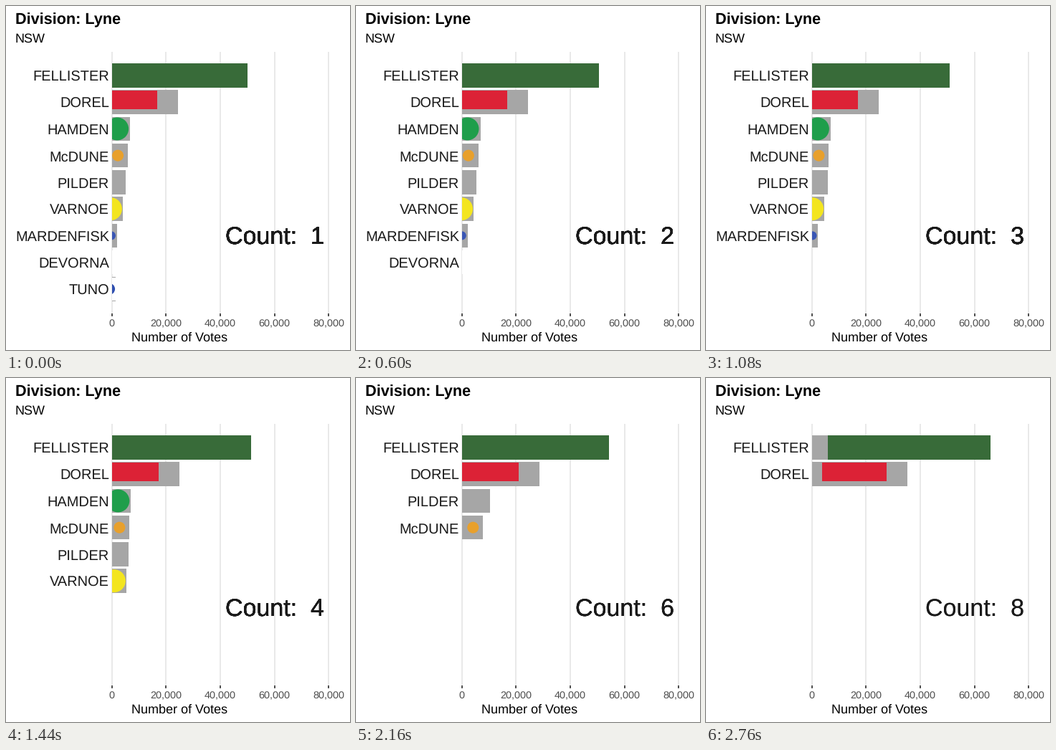
Write a matplotlib script that moves like this. It is 480 px wide and 480 px high and loops after 3000 ms.

```python
import matplotlib.pyplot as plt
import numpy as np
from matplotlib.animation import FuncAnimation
from matplotlib.patches import Circle, Rectangle

plt.rcParams["font.family"] = "Liberation Sans"
plt.rcParams["text.hinting"] = "none"

SIZE, DPI = 480, 100
FRAMES, INTERVAL = 25, 120
X0, PX_PER_K = 147.8, 3.78          # axis zero, pixels per thousand votes
TOP, PITCH, BAR_H = 80.1, 37.25, 33.6
GREY = "#a6a6a6"

# Thousands of votes at each count, until the candidate is excluded
VOTES = {
    "FELLISTER": (50.1, 50.6, 50.9, 51.4, 53.5, 54.3, 57.8, 65.9),
    "DOREL": (24.4, 24.5, 24.7, 25.0, 25.5, 28.7, 30.0, 35.2),
    "HAMDEN": (6.7, 6.8, 6.9, 7.0, 7.2),
    "McDUNE": (5.9, 6.1, 6.25, 6.5, 7.3, 7.8),
    "PILDER": (5.1, 5.4, 5.9, 6.2, 7.7, 10.4, 13.2),
    "VARNOE": (4.0, 4.3, 4.6, 5.3),
    "MARDENFISK": (1.9, 2.1, 2.3),
    "DEVORNA": (1.6, 1.7),
    "TUNO": (1.4,),
}

# Party blocks: colour, left and right edge from the bar's end, top, height
BLOCKS = {
    "FELLISTER": ("#386b39", -227, 0, 0, BAR_H),
    "DOREL": ("#dc2236", -119, -29, 0.4, 26),
    "DEVORNA": ("white", -34, 0, 0.2, BAR_H - 0.6),
    "TUNO": ("white", -34, 0, 0.4, BAR_H - 0.8),
}
# Party discs: colour, radius, distance of the centre from the bar's end
DISCS = {
    "HAMDEN": ("#1f9e4b", 16, 18),
    "McDUNE": ("#e8a02c", 8, 14),
    "VARNOE": ("#f3e51f", 16, 17),
    "MARDENFISK": ("#3a56b4", 6, 8),
    "TUNO": ("#2f4fb0", 8, 9),
}

# Frames between which each count stands still
ENTER = (0, 3, 7, 10, 13, 16, 19, 22)
LEAVE = (1, 5, 9, 12, 15, 18, 21, 24)
KEY_TIMES = np.ravel(list(zip(ENTER, LEAVE)))
KEY_COUNTS = np.repeat(np.arange(8), 2)

fig = plt.figure(figsize=(SIZE / DPI, SIZE / DPI), dpi=DPI, facecolor="white")
ax = fig.add_axes([0, 0, 1, 1])
ax.set_xlim(0, SIZE)
ax.set_ylim(SIZE, 0)
ax.axis("off")

panel = ax.add_patch(Rectangle((X0, 64), SIZE - X0, 365, fc="none", ec="none"))
moving = []


def text(x, y, s, px, color="black", **kw):
    return ax.text(x, y, s, fontsize=px * 72 / DPI, color=color,
                   va="baseline", **kw)


def vline(x, y0, y1, color, px):
    ax.plot([x, x], [y0, y1], color=color, lw=px * 72 / DPI,
            solid_capstyle="butt", zorder=1)


def add(patch):
    ax.add_patch(patch)
    patch.set_clip_path(panel)
    moving.append(patch)


def box(x, y, w, h, color):
    add(Rectangle((x, y), w, h, fc=color, ec="none", zorder=2))


def draw_static():
    text(13, 25, "Division: Lyne", 21.6, weight="bold")
    text(13, 51, "NSW", 18)
    text(242, 468, "Number of Votes", 18, ha="center")
    for k in range(0, 81, 20):
        x = X0 + k * PX_PER_K
        vline(x, 64, 429, "#e6e6e6", 1.7)
        vline(x, 429, 433, "#333333", 1.7)
        text(x, 447, f"{k * 1000:,}", 14.4, "#4d4d4d", ha="center")


def draw_row(row, name, votes):
    y = TOP + row * PITCH
    w = votes * PX_PER_K
    end = X0 + w
    box(X0, y, w, BAR_H, GREY)
    if name in BLOCKS:
        color, left, right, top, height = BLOCKS[name]
        box(end + left, y + top, right - left, height, color)
    if name in DISCS:
        color, radius, back = DISCS[name]
        add(Circle((end - back, y + BAR_H / 2), radius, fc=color, ec="none",
                   zorder=3))
    moving.append(text(144, y + 24.8, name, 20, "#1a1a1a", ha="right"))


def update(frame):
    while moving:
        moving.pop().remove()
    pos = np.interp(frame, KEY_TIMES, KEY_COUNTS)
    count = int(pos + 0.5)
    standing = {name: np.interp(pos, range(len(v)), v)
                for name, v in VOTES.items() if len(v) > count}
    for row, name in enumerate(sorted(standing, key=standing.get, reverse=True)):
        draw_row(row, name, standing[name])
        # One label per row: the stacking darkens its edges
        moving.append(text(305.5, 333, f"Count:  {count + 1}", 34, "#1a1a1a"))
    return moving


draw_static()
anim = FuncAnimation(fig, update, frames=FRAMES, interval=INTERVAL,
                     init_func=lambda: [], repeat=True, repeat_delay=0,
                     blit=False)
plt.show()
```
